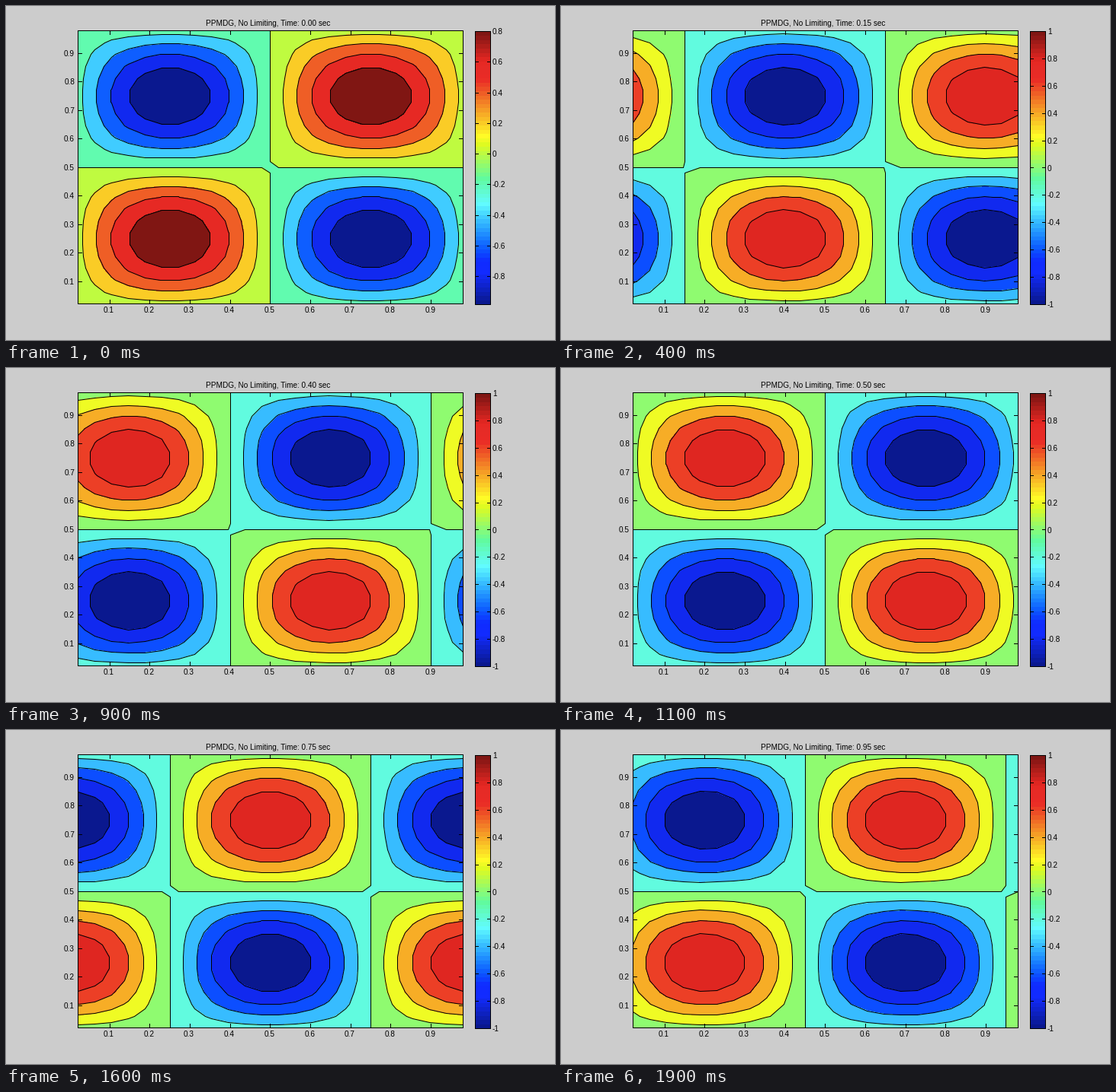
These frames come from a looping animation (720 px wide and 439 px high, 2100 ms). A matplotlib script:

```python
import numpy as np
import matplotlib.pyplot as plt
from matplotlib.animation import FuncAnimation
from matplotlib.colors import ListedColormap

W, H, DPI = 720, 439, 72          # at 72 dpi one point is one pixel
SLOTS, SLOT_MS = 21, 100

# Pixel indices; snapped lines land on the middle of these pixels
LEFT, RIGHT, TOP, BOTTOM = 94, 599, 32, 391
BAR_L, BAR_R, BAR_T, BAR_B = 615, 635, 33, 392

N = 24                             # grid cells per side
cells = (np.arange(N) + 0.5) / N
LEVELS = np.arange(-4, 5) / 5


def jet_colors():
    """64-step jet, with the primaries softened as on a wide-gamut screen."""
    i = np.arange(64)

    def ramp(start, end):
        return np.clip(np.minimum(i - start, end - i) / 16, 0, 1)

    r, g, b = ramp(23, 71), ramp(7, 55), ramp(-9, 39)
    red = np.maximum.reduce([np.minimum(r, 0.9 + 0.1 * g),
                             0.38 * g ** 2, 0.07 * b * (1 - g)])
    green = np.maximum(0.985 * g, 0.17 * np.maximum(r, b))
    blue = np.maximum(b, 0.15 * r)
    return np.column_stack([red, green, blue])


JET = jet_colors()


def px_x(x):
    return LEFT + (x - cells[0]) / (cells[-1] - cells[0]) * (RIGHT - LEFT)


def px_y(y):
    return BOTTOM - (y - cells[0]) / (cells[-1] - cells[0]) * (BOTTOM - TOP)


# The small shift settles which way half pixels round
GX, GY = np.meshgrid(px_x(cells) - 0.2, px_y(cells) + 0.2)

fig = plt.figure(figsize=((W + 0.01) / DPI, (H + 0.01) / DPI), dpi=DPI,
                 facecolor="#cccccc")
ax = fig.add_axes([0, 0, 1, 1])


def line(xs, ys):
    ax.plot(xs, ys, color="black", lw=1, snap=True, zorder=5)


def box(l, r, t, b):
    line([l, r, r, l, l], [t, t, b, b, t])


def label(x, y, text, ha):
    ax.text(x, y, text, ha=ha, va="baseline", fontsize=10,
            family="Liberation Sans", color="black", zorder=6)


def side_ticks(l, r, y, size):
    line([l, l + size], [y, y])
    line([r - size, r], [y, y])


def draw_field(time, lo, hi):
    # The tiny bias joins the negative regions at the saddle points
    wave = np.sin(2 * np.pi * (cells - time))
    z = np.outer(np.sin(2 * np.pi * cells), wave) - 1e-9
    values = np.concatenate([[lo], LEVELS])
    index = ((values - lo) / (hi - lo) * 64 + 1e-9).astype(int).clip(0, 63)
    ax.contourf(GX + 0.5, GY + 0.5, z, levels=[-2, *LEVELS, 2],
                colors=JET[index], antialiased=False, zorder=1)
    lines = ax.contour(GX, GY, z, levels=LEVELS, colors="black",
                       linewidths=1, linestyles="solid", zorder=2)
    lines.set_snap(True)


def draw_axes():
    box(LEFT, RIGHT, TOP, BOTTOM)
    for k in range(1, 10):
        text = f"{k / 10:.1f}"
        x, y = px_x(k / 10) - 0.2, px_y(k / 10) + 0.2
        line([x, x], [TOP, TOP + 5])
        line([x, x], [BOTTOM - 5, BOTTOM])
        side_ticks(LEFT, RIGHT, y, 5)
        label(x - 0.8, 403, text, "center")
        label(90, y + 4, text, "right")


def draw_bar(lo, hi):
    ax.pcolormesh([BAR_L + 0.5, BAR_R + 0.5],
                  np.linspace(BAR_B, BAR_T, 65) + 0.5,
                  np.arange(64)[:, None], cmap=ListedColormap(JET),
                  vmin=-0.5, vmax=63.5, zorder=1)
    box(BAR_L, BAR_R, BAR_T, BAR_B)
    for k in range(-5, 6):
        v = k / 5
        if lo <= v <= hi:
            y = BAR_B - (v - lo) / (hi - lo) * (BAR_B - BAR_T)
            side_ticks(BAR_L, BAR_R, y, 4)
            label(638, y + 4, f"{v:g}", "left")


def draw(slot):
    # Steps trail the clock by one slot, except where they catch up
    step = slot if slot in (6, 19) else max(slot - 1, 0)
    time = step * 0.05
    lo, hi = (-1, 1) if step else (-np.cos(np.pi / N) ** 2, 0.8)
    ax.clear()
    draw_field(time, lo, hi)
    draw_axes()
    draw_bar(lo, hi)
    label(261.5, 26, f"PPMDG, No Limiting, Time: {time:.2f} sec", "left")
    ax.set(xlim=(0, W), ylim=(H, 0))
    ax.axis("off")
    return []


anim = FuncAnimation(fig, draw, frames=SLOTS, interval=SLOT_MS,
                     init_func=lambda: [], repeat=True, repeat_delay=0)
plt.show()
```
